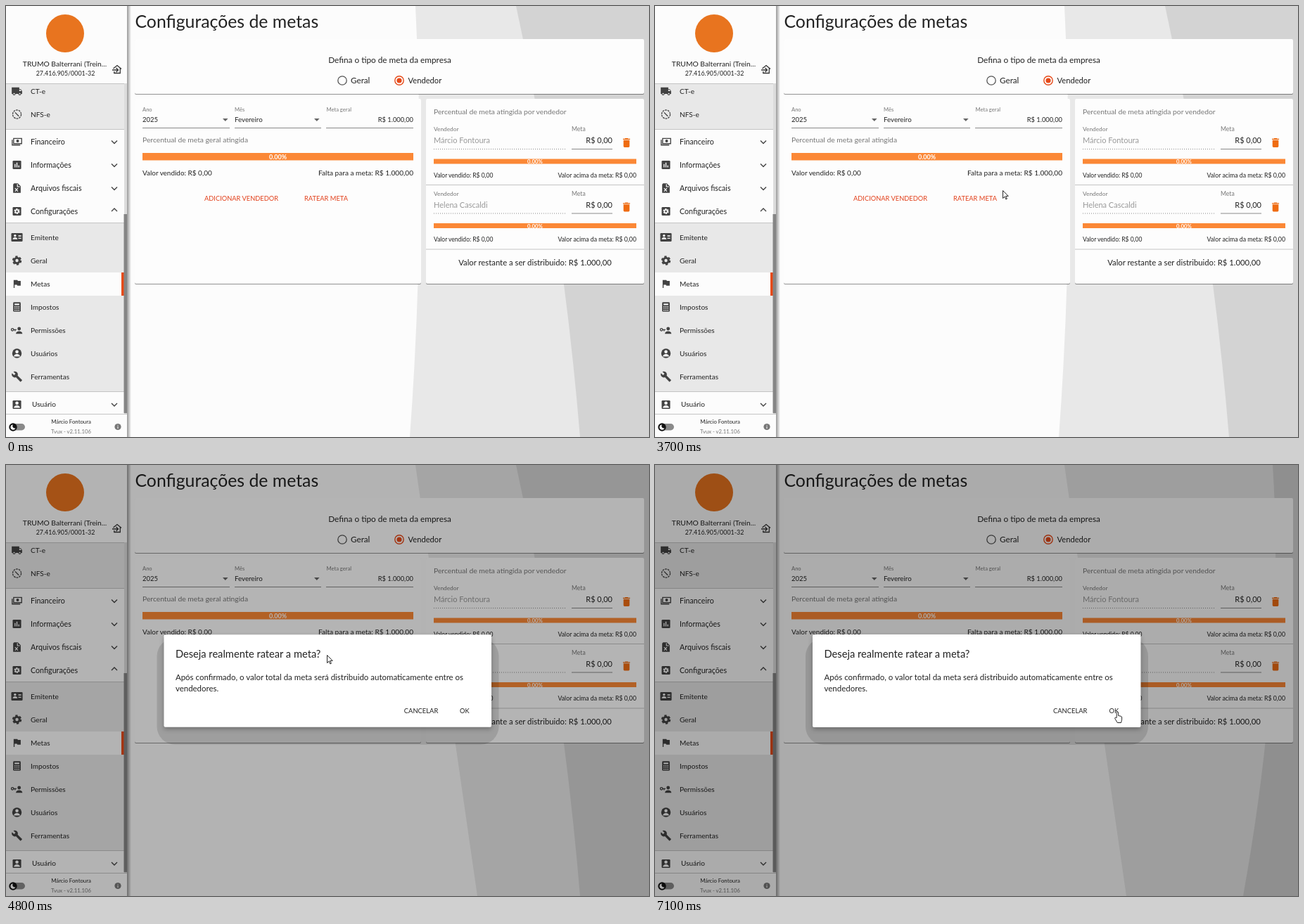
An HTML page that plays this animation: 914x613 px, repeating every 8 s.

```html
<!DOCTYPE html>
<html lang="pt-BR">
<head>
<meta charset="utf-8">
<title>Configurações de metas</title>
<style>
html, body { margin: 0; width: 100%; height: 100%; overflow: hidden; background: #fcfcfc; }
svg { display: block; width: 914px; height: 613px; }
text { font-family: Lato, "Open Sans", sans-serif; fill: #222; }
.end { text-anchor: end; }
.mid { text-anchor: middle; }
.soft { fill: #777; }
.label { fill: #777; font-size: 7.6px; }
.name { fill: #999; font-size: 11px; }
.link { fill: #e2401b; font-size: 9.3px; }
.pct { fill: #fff; font-weight: 700; text-anchor: middle; }
.group text { font-size: 10.7px; }
.sub text { font-size: 10.1px; }
.card { fill: #fdfdfd; filter: drop-shadow(0 1px .6px rgba(0, 0, 0, .42)); }
.bar { fill: #fb8836; }
.trash { fill: #ef6c12; }
.icon { fill: #424242; stroke: none; }
.icon .hole { fill: #fff; }
.icon .ring { fill: none; stroke: #424242; stroke-width: 2; }
.rule { stroke: #8a8a8a; stroke-width: 1; }
.split { stroke: #c4c4c4; stroke-width: 1; }
.chev { fill: none; stroke: #444; stroke-width: 1.4; }
#box { fill: #fff; filter: drop-shadow(0 3px 3px rgba(0, 0, 0, .28)); }
#cursor path { fill: #fff; stroke: #111; stroke-width: .9; stroke-linejoin: round; }
</style>
</head>
<body>
<svg viewBox="0 0 914 613">
  <defs>
    <linearGradient id="edge">
      <stop offset="0" stop-color="#999"/>
      <stop offset="1" stop-color="#999" stop-opacity="0"/>
    </linearGradient>
    <g id="person"><circle cx="12" cy="8.5" r="3.4"/><path d="M5.5 18.5c0-7 13-7 13 0z"/></g>
    <g id="vendor">
      <text class="soft" x="608" y="178" font-size="8.3">Vendedor</text>
      <text class="soft" x="804" y="178" font-size="8.6">Meta</text>
      <text class="end" x="862" y="195" font-size="11">R$ 0,00</text>
      <path class="rule" d="M608 203.5h188" stroke-dasharray="1 2"/>
      <path class="rule" d="M804 203.5h58"/>
      <path class="trash" transform="translate(873.4 185.8) scale(.72)" d="M6 19a2 2 0 0 0 2 2h8a2 2 0 0 0 2-2V7H6zM19 4h-3.5l-1-1h-5l-1 1H5v2h14z"/>
      <rect class="bar" x="608" y="217.5" width="288" height="7"/>
      <text class="pct" x="752" y="224" font-size="7.8">0.00%</text>
      <text x="608" y="243.8" font-size="8.5">Valor vendido: R$ 0,00</text>
      <text class="end" x="896" y="243.8" font-size="8.75">Valor acima da meta: R$ 0,00</text>
      <path class="split" d="M597 254.5h310"/>
    </g>
  </defs>

  <rect width="914" height="613" fill="#fcfcfc"/>
  <g id="bands"></g>

  <text x="183.5" y="30.5" font-size="24.8">Configurações de metas</text>

  <rect class="card" x="183" y="47" width="724" height="78" rx="2"/>
  <text class="mid" x="545.5" y="81" font-size="11.8">Defina o tipo de meta da empresa</text>
  <circle cx="478" cy="106" r="6.2" fill="none" stroke="#555" stroke-width="1.3"/>
  <text x="490" y="110" font-size="11.7">Geral</text>
  <circle cx="559" cy="106" r="6.2" fill="none" stroke="#e64a19" stroke-width="1.4"/>
  <circle cx="559" cy="106" r="3.6" fill="#e64a19"/>
  <text x="571.5" y="110" font-size="11.2">Vendedor</text>

  <rect class="card" x="183" y="132" width="407" height="263" rx="2"/>
  <text class="label" x="194" y="150">Ano</text>
  <text class="label" x="325" y="150">Mês</text>
  <text class="label" x="455.5" y="150">Meta geral</text>
  <text x="194" y="165" font-size="9.5">2025</text>
  <text x="325" y="165" font-size="9.7">Fevereiro</text>
  <text class="end" x="579" y="165" font-size="9.3">R$ 1.000,00</text>
  <path d="M308 160h7.6l-3.8 4zM438 160h7.6l-3.8 4z" fill="#666"/>
  <path class="rule" d="M194 173.5h124M325 173.5h123M455 173.5h124"/>
  <text class="soft" x="194" y="194" font-size="10.3">Percentual de meta geral atingida</text>
  <rect class="bar" x="194" y="209" width="385" height="10.5"/>
  <text class="pct" x="386.5" y="217.7" font-size="9">0.00%</text>
  <text x="194" y="241.2" font-size="9.95">Valor vendido: R$ 0,00</text>
  <text class="end" x="579" y="241.2" font-size="10.1">Falta para a meta: R$ 1.000,00</text>
  <rect id="press" x="418" y="262" width="78" height="24" rx="3" fill="#f6c9bc"/>
  <text class="link" x="282" y="277.3">ADICIONAR VENDEDOR</text>
  <text class="link" x="424" y="277.3">RATEAR META</text>

  <rect class="card" x="597" y="132" width="310" height="263" rx="2"/>
  <text class="soft" x="608" y="154" font-size="10.3">Percentual de meta atingida por vendedor</text>
  <use href="#vendor"/>
  <use href="#vendor" y="91.5"/>
  <text class="name" x="608" y="195">Márcio Fontoura</text>
  <text class="name" x="608" y="287">Helena Cascaldi</text>
  <text class="mid" x="752" y="369" font-size="11.3">Valor restante a ser distribuido: R$ 1.000,00</text>

  <rect x="172" width="6" height="613" fill="url(#edge)"/>
  <rect width="172" height="613" fill="#fcfcfc"/>
  <path d="M0 110h168v66H0zM0 308h168v240H0z" fill="#e8e8e8"/>
  <path d="M0 379h168v33H0z" fill="#fcfcfc"/>
  <path d="M164 379h4v33h-4z" fill="#e64a19"/>
  <path class="split" d="M0 110.5h172M0 175.5h168M0 308.5h168M0 548.5h168M0 580.5h172"/>
  <path d="M168 110h4v470h-4z" fill="#dcdcdc"/>
  <path d="M167.5 296h4.5v283h-4.5z" fill="#858585"/>
  <circle cx="84" cy="39" r="27" fill="#e8741f"/>
  <text class="mid" x="83.5" y="86" font-size="10.3">TRUMO Balterrani (Trein...</text>
  <text class="mid" x="84.5" y="99" font-size="8.9">27.416.905/0001-32</text>
  <path d="M151 91h8.5m-3-3 3 3-3 3M152.5 89l5.5-4.5 6 5M162.300 88.500V95.500h-8.500V93" fill="none" stroke="#333" stroke-width="1.3"/>

  <g class="sub">
    <text x="35" y="124.5">CT-e</text>
    <text x="35" y="157.5">NFS-e</text>
    <text x="35" y="333">Emitente</text>
    <text x="35" y="366">Geral</text>
    <text x="35" y="399">Metas</text>
    <text x="35" y="432">Impostos</text>
    <text x="35" y="465">Permissões</text>
    <text x="35" y="498">Usuários</text>
    <text x="35" y="531">Ferramentas</text>
    <text x="37" y="569.5">Usuário</text>
  </g>
  <g class="group">
    <text x="35" y="196.5">Financeiro</text>
    <text x="35" y="229.5">Informações</text>
    <text x="35" y="262.5">Arquivos fiscais</text>
    <text x="35" y="295.5">Configurações</text>
  </g>
  <path class="chev" d="M150 191.5l4 4 4-4M150 224.5l4 4 4-4M150 257.5l4 4 4-4M150 292l4-4 4 4M150 565l4 4 4-4"/>

  <g class="icon" id="icons">
    <g data-y="121"><path d="M1 4h16v4h3l3 4v6h-2a3 3 0 0 1-6 0H9a3 3 0 0 1-6 0H1z"/><path class="hole" d="M17 9.5h2.5l2 2.5H17z"/><circle class="hole" cx="6" cy="17.5" r="1.4"/><circle class="hole" cx="18" cy="17.5" r="1.4"/></g>
    <g data-y="154"><circle class="ring" cx="12" cy="12" r="9" stroke-dasharray="4 1.6"/><path class="ring" d="M8 8l8 8"/></g>
    <g data-y="193"><path class="ring" d="M5 5h17v11H5zM2 8v11h17"/><circle cx="13.5" cy="10.5" r="3"/></g>
    <g data-y="226"><rect x="3" y="3" width="18" height="18" rx="2"/><path class="hole" d="M7 10h2v7H7zM11 7h2v10h-2zM15 13h2v4h-2z"/></g>
    <g data-y="259"><path d="M6 2h8l6 6v14H4V4z"/><path d="M13 3.5V9h5.5M8 12l6 7M14 12l-6 7" fill="none" stroke="#fff" stroke-width="1.7"/></g>
    <g data-y="292"><rect x="3" y="3" width="18" height="18" rx="2"/><circle cx="12" cy="12" r="4.5" fill="none" stroke="#fff" stroke-width="3" stroke-dasharray="3.2 1.51"/><circle cx="12" cy="12" r="3" fill="none" stroke="#fff" stroke-width="2"/></g>
    <g data-y="329"><rect y="3" width="24" height="18" rx="2"/><use class="hole" href="#person" transform="translate(-1 2) scale(.75)"/><path class="hole" d="M15 8h6v2h-6zM15 13h6v2h-6z"/></g>
    <g data-y="362"><circle class="ring" cx="12" cy="12" r="8" style="stroke-width:4" stroke-dasharray="4.6 3.778"/><circle class="ring" cx="12" cy="12" r="5.5" style="stroke-width:4.5"/></g>
    <g data-y="395"><path d="M14 6l-1-2H5v17h2v-7h5l1 2h7V6z"/></g>
    <g data-y="428"><rect x="4" y="2" width="16" height="20" rx="2"/><path class="hole" d="M7 5h10v3H7z"/><path d="M7 11.5h10M7 15.2h10M7 19h10" stroke="#fff" stroke-width="2" stroke-dasharray="2 2"/></g>
    <g data-y="461"><use href="#person" transform="translate(4 0) scale(1.06)"/><circle class="ring" cx="2.5" cy="11" r="2.5"/><path d="M5 10h6v2H9v2H7v-2H5z"/></g>
    <g data-y="494"><circle cx="12" cy="12" r="10"/><use class="hole" href="#person"/></g>
    <g data-y="527"><path d="M22.7 19l-9.1-9.1c.9-2.3.4-5-1.5-6.9-2-2-5-2.4-7.4-1.3L9 6 6 9 1.6 4.7C.4 7.1.9 10.1 2.9 12.1c1.9 1.9 4.6 2.4 6.9 1.5l9.1 9.1c.4.4 1 .4 1.4 0l2.3-2.3c.5-.4.5-1.1.1-1.4z"/></g>
    <g data-y="567"><rect x="3" y="3" width="18" height="18" rx="2"/><use class="hole" href="#person"/></g>
  </g>

  <rect x="6" y="594" width="21" height="9.5" rx="4.75" fill="#8a8a8a"/>
  <circle cx="10" cy="599" r="5.7" fill="#111"/>
  <path d="M10 595.5a3.6 3.6 0 1 0 3.5 4.7 3 3 0 0 1-3.5-4.7z" fill="#fff"/>
  <text class="mid" x="92.5" y="593.5" font-size="7.8">Márcio Fontoura</text>
  <text class="mid soft" x="92.5" y="607.5" font-size="7.7">Tvux - v2.11.106</text>
  <circle cx="159" cy="598.5" r="4.6" fill="#777"/>
  <path d="M158.5 595.8h1v1h-1zM158.5 597.8h1v3.4h-1z" fill="#fff"/>

  <rect id="dim" width="914" height="613"/>

  <g id="dialog">
    <rect x="214" y="246" width="487" height="152" rx="26" opacity=".12"/>
    <rect id="box" x="224" y="241" width="466.5" height="132" rx="2"/>
    <text x="240.5" y="273.5" font-size="14.7">Deseja realmente ratear a meta?</text>
    <text x="240.5" y="305.8" font-size="11.5">Após confirmado, o valor total da meta será distribuido automaticamente entre os</text>
    <text x="240.5" y="322.3" font-size="11.5">vendedores.</text>
    <text x="566" y="353" font-size="9.4">CANCELAR</text>
    <text x="645.5" y="353" font-size="9.3">OK</text>
  </g>

  <g id="cursor">
    <path id="arrow" d="M.5.5v11l2.6-2.4 1.7 3.8 1.6-.7-1.7-3.8h3.5z"/>
    <path id="hand" d="M3.2 9V1.7a1.2 1.2 0 0 1 2.4 0V6l3.7.8a1.7 1.7 0 0 1 1.3 1.7v3.2L9.5 16H4.3L.8 10.2a1 1 0 0 1 1.5-1.3z"/>
  </g>
</svg>
<script>
const LOOP = 8000;
const $ = id => document.getElementById(id);
const show = (el, on) => { el.style.display = on ? '' : 'none'; };

for (const icon of $('icons').children) {
  icon.setAttribute('transform', `translate(7.5 ${icon.dataset.y - 8}) scale(.67)`);
}

// Background curves, each filling everything to its right
const nearLight = 'M582 0Q597 300 574 613';
const nearDim = 'M582 0Q622 280 670 613';
const middle = 'M725 0Q790 300 816 613';
const far = 'M878 0Q896 280 836 613';
const fade = 'M393 0Q399 280 376 613';

// Scene: start, backdrop, dialog opacity, dialog scale, background bands
const scenes = [
  [0, 0, 0, 1, [[nearLight, '#e8e8e8'], [middle, '#d3d3d3']]],
  [4700, .1, .56, .863, [[fade, '#f0f0f0'], [middle, '#dddddd'], [far, '#d0d0d0']]],
  [4800, .29, 1, .998, [[nearDim, '#e8e8e8'], [middle, '#d3d3d3']]],
  [4900, .32, 1, 1, [[nearDim, '#e8e8e8'], [far, '#d3d3d3']]]
];

// Pointer: time, x, y, hand
const moves = [
  [3500, 662, 236], [3600, 582, 247], [3700, 494, 262], [3800, 434, 270, 1], [3900, 453, 270, 1],
  [4700, 456, 270], [5300, 440, 277], [5400, 406, 287.5], [5500, 394, 294], [5600, 389, 297],
  [6100, 394, 299], [6200, 425, 306], [6300, 478, 315], [6400, 540, 324],
  [6500, 595, 331], [6600, 627, 335], [6700, 634, 336],
  [6900, 640, 342], [7000, 649, 349], [7100, 653, 350.5, 1]
];

const latest = (list, t) => list.filter(step => step[0] <= t).pop();
let scene;

function setScene(next) {
  if (next === scene) return;
  scene = next;
  const [, shade, opacity, scale, bands] = scene;
  $('bands').innerHTML = bands.map(([d, fill]) => `<path d="${d}H914V0z" fill="${fill}"/>`).join('');
  $('dim').setAttribute('opacity', shade);
  show($('press'), opacity > 0);
  show($('dialog'), opacity > 0);
  $('dialog').setAttribute('opacity', opacity);
  $('dialog').setAttribute('transform', `translate(457.2 307) scale(${scale}) translate(-457.2 -307)`);
}

function setCursor(move) {
  show($('cursor'), move);
  if (!move) return;
  const [, x, y, hand] = move;
  $('cursor').setAttribute('transform', `translate(${x} ${y})`);
  show($('hand'), hand);
  show($('arrow'), !hand);
}

const start = performance.now();
function draw() {
  const t = (performance.now() - start) % LOOP;
  setScene(latest(scenes, t));
  setCursor(latest(moves, t));
  requestAnimationFrame(draw);
}
draw();
</script>
</body>
</html>
```
